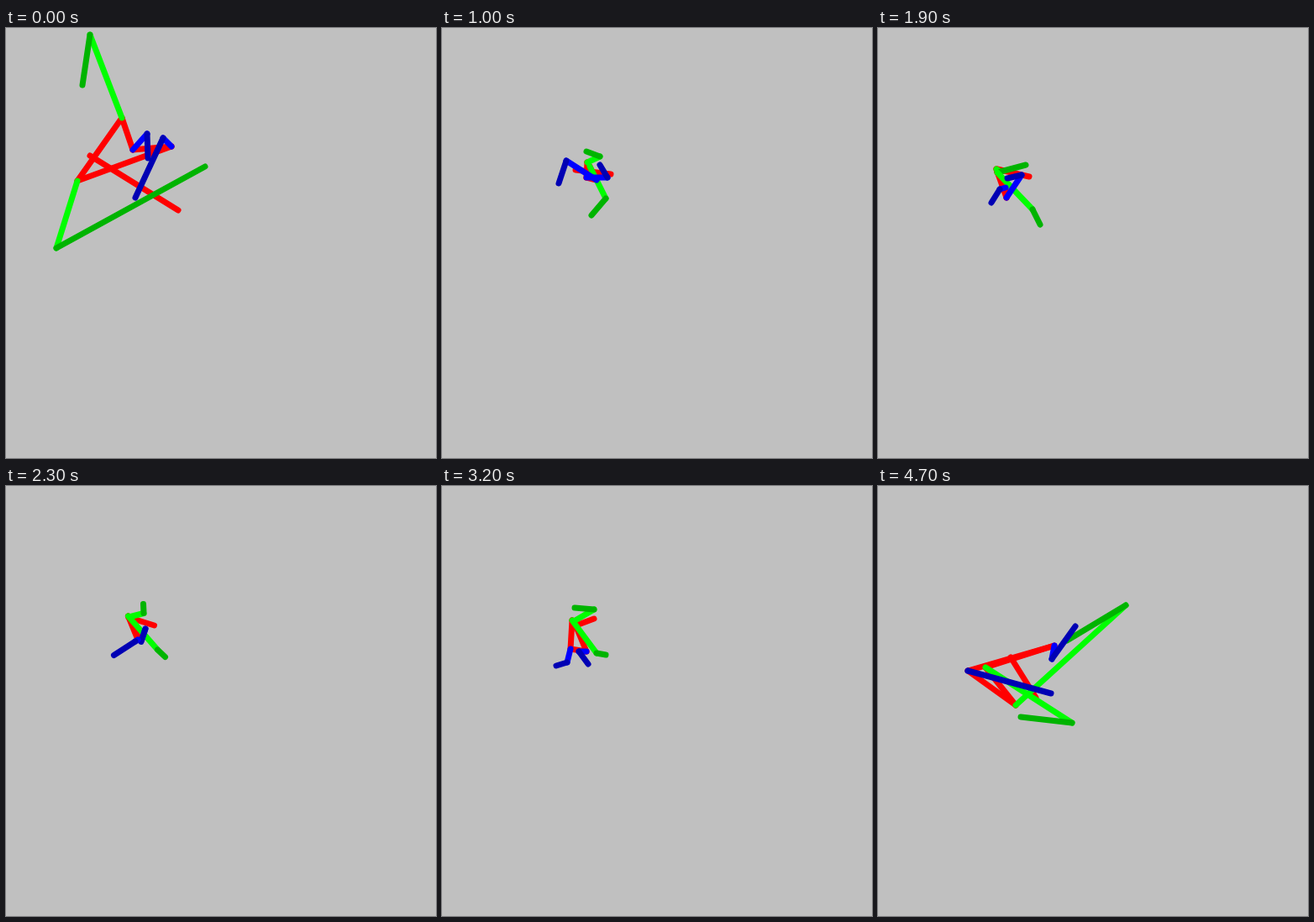
An HTML page with a canvas that plays this animation: 512 by 512 pixels, repeating every 4800 ms.

```html
<!DOCTYPE html>
<html lang="en">
<head>
<meta charset="utf-8">
<title>Stick figure</title>
<style>
html, body { margin: 0; width: 100%; height: 100%; overflow: hidden; background: #c0c0c0; }
canvas { display: block; width: 512px; height: 512px; }
</style>
</head>
<body>
<canvas id="stage" width="512" height="512"></canvas>
<script>
const LOOP = 4800, STEP = 100;
const ctx = document.getElementById('stage').getContext('2d');
const times = [0, 1000, 1900, 2700, 3200, 4000, 4700];

// One row per key time; x, y pairs.
// Neck, head, shoulder A, shoulder B, hip A, hip B
const trunk = [
  [100,152, 205,217, 138,107, 85,182, 151,145, 197,141],
  [159,169, 201,174, 173,160, 176,165, 172,178, 184,181],
  [142,168, 180,177, 141,168, 142,172, 153,202, 152,190],
  [150,145, 173,155, 152,144, 149,138, 170,164, 162,176],
  [157,167, 181,158, 157,161, 155,160, 172,197, 153,194],
  [160,147, 176,164, 166,152, 166,153, 172,166, 163,191],
  [158,204, 188,252, 164,261, 128,216, 107,220, 210,190]
];
// Elbow A, wrist A, elbow B, wrist B
const arms = [
  [100,8, 91,68, 60,262, 237,165],
  [188,153, 172,147, 195,203, 178,223],
  [146,171, 176,163, 184,216, 193,234],
  [182,132, 151,118, 177,174, 186,173],
  [181,147, 158,145, 184,199, 195,201],
  [166,145, 182,153, 178,191, 171,217],
  [295,142, 225,184, 231,282, 170,275]
];
// Knee A, ankle A, knee B, ankle B
const legs = [
  [168,126, 169,155, 187,131, 154,202],
  [197,178, 188,163, 148,158, 139,185],
  [171,175, 154,179, 145,192, 135,208],
  [161,165, 168,192, 163,178, 122,195],
  [163,197, 174,212, 149,210, 136,214],
  [153,164, 189,176, 152,193, 131,193],
  [107,220, 206,247, 207,206, 235,167]
];

const linear = u => u;
const easeOut = u => 1 - (1 - u) ** 3;
const easeIn = u => u ** 3;

function points(rows, i, p) {
  const mixed = rows[i].map((v, k) => v + (rows[i + 1][k] - v) * p);
  const out = [];
  for (let k = 0; k < mixed.length; k += 2) out.push([mixed[k], mixed[k + 1]]);
  return out;
}

function bone(color, a, b) {
  ctx.strokeStyle = color;
  ctx.beginPath();
  ctx.moveTo(a[0], a[1]);
  ctx.lineTo(b[0], b[1]);
  ctx.stroke();
}

function limb(upper, lower, a, b, c) {
  bone(upper, a, b);
  bone(lower, b, c);
}

function draw(time) {
  const last = times.length - 2;
  let i = 0;
  while (i < last && time >= times[i + 1]) i++;
  const ease = i === 0 ? easeOut : i === last ? easeIn : linear;
  const p = ease((time - times[i]) / (times[i + 1] - times[i]));
  const [neck, head, shA, shB, hipA, hipB] = points(trunk, i, p);
  const [elA, wrA, elB, wrB] = points(arms, i, p);
  const [knA, anA, knB, anB] = points(legs, i, p);

  ctx.fillStyle = '#c0c0c0';
  ctx.fillRect(0, 0, 512, 512);
  ctx.lineWidth = 7;
  ctx.lineCap = 'round';

  bone('#f00', neck, head);
  bone('#f00', shA, shB);
  bone('#f00', shA, hipA);
  bone('#f00', hipA, hipB);
  bone('#f00', hipB, shB);
  limb('#0f0', '#00b400', shA, elA, wrA);
  limb('#0f0', '#00b400', shB, elB, wrB);
  limb('#00f', '#0000b4', hipA, knA, anA);
  limb('#00f', '#0000b4', hipB, knB, anB);
}

const start = performance.now();
function tick() {
  const t = (performance.now() - start) % LOOP;
  draw(Math.floor(t / STEP) * STEP);
  requestAnimationFrame(tick);
}
tick();
</script>
</body>
</html>
```
